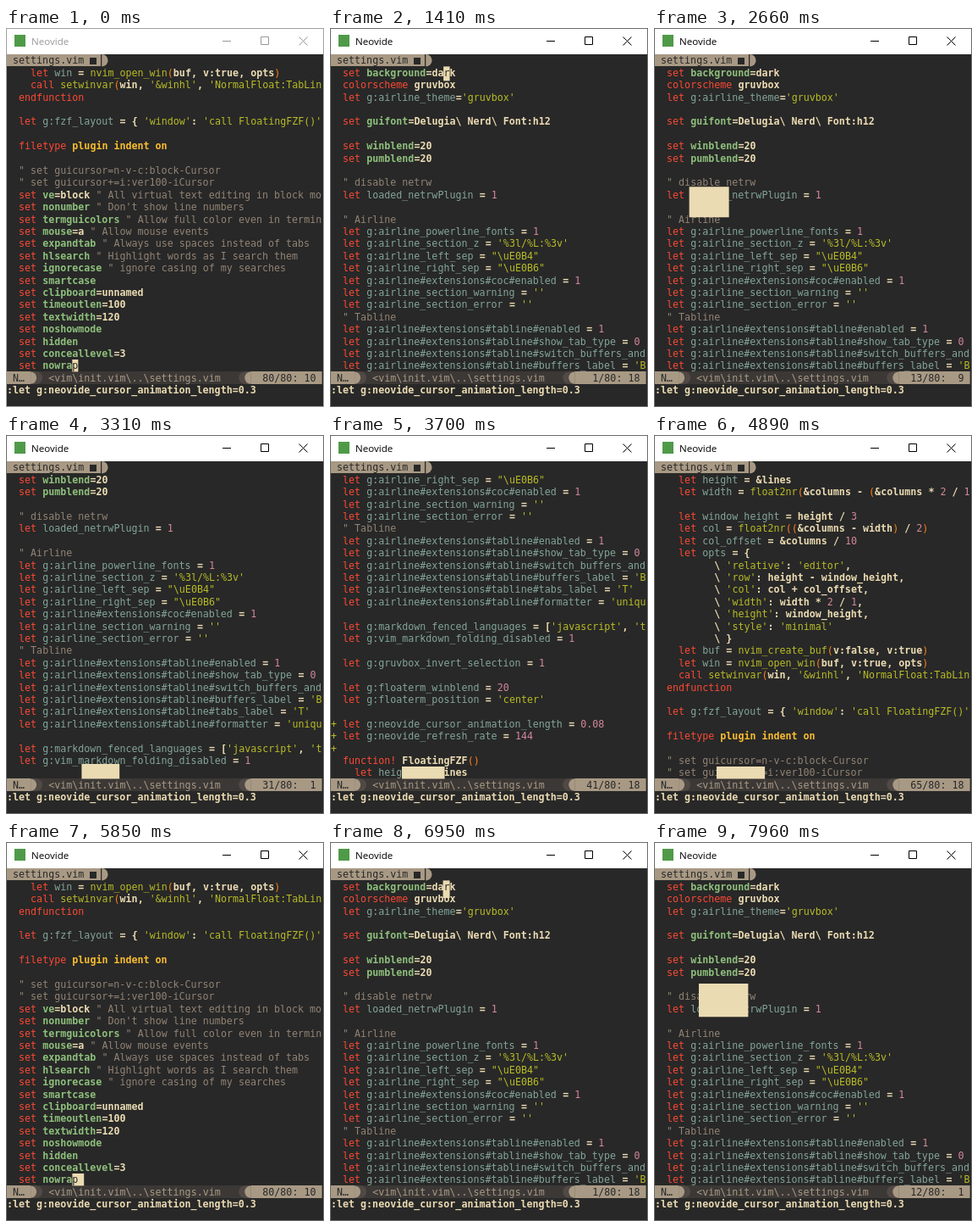
Write an HTML page with a canvas that moves like this. It is 376x447 px and loops after 7.99 s.

```html
<!DOCTYPE html>
<html lang="en">
<head>
<meta charset="utf-8">
<title>Neovide</title>
<style>
  html, body { margin: 0; width: 100%; height: 100%; overflow: hidden; background: #282828; }
  canvas { display: block; width: 376px; height: 447px; }
</style>
</head>
<body>
<canvas id="stage" width="376" height="447"></canvas>
<script>
const ctx = document.getElementById('stage').getContext('2d');
const LOOP = 7990, ROWS = 25, WANTED_COLUMN = 18;
const CELL_W = 7.03, CELL_H = 14.4, LEFT = 1, TOP = 31;
const MONO = '11.677px "DejaVu Sans Mono", monospace';
const C = {
  bg: '#282828', fg: '#ebdbb2', red: '#fb4934', green: '#b8bb26', yellow: '#fabd2f',
  blue: '#83a598', purple: '#d3869b', aqua: '#8ec07c', orange: '#fe8019',
  gray: '#928374', bar: '#3c3836', barMid: '#504945', barLight: '#a89984'
};
const BOLD = [C.fg, C.aqua, C.yellow];

const lines = String.raw`set background=dark
colorscheme gruvbox
let g:airline_theme='gruvbox'

set guifont=Delugia\ Nerd\ Font:h12

set winblend=20
set pumblend=20

" disable netrw
let loaded_netrwPlugin = 1

" Airline
let g:airline_powerline_fonts = 1
let g:airline_section_z = '%3l/%L:%3v'
let g:airline_left_sep = "\uE0B4"
let g:airline_right_sep = "\uE0B6"
let g:airline#extensions#coc#enabled = 1
let g:airline_section_warning = ''
let g:airline_section_error = ''
" Tabline
let g:airline#extensions#tabline#enabled = 1
let g:airline#extensions#tabline#show_tab_type = 0
let g:airline#extensions#tabline#switch_buffers_and
let g:airline#extensions#tabline#buffers_label = 'B
let g:airline#extensions#tabline#tabs_label = 'T'
let g:airline#extensions#tabline#formatter = 'uniqu

let g:markdown_fenced_languages = ['javascript', 't
let g:vim_markdown_folding_disabled = 1

let g:gruvbox_invert_selection = 1

let g:floaterm_winblend = 20
let g:floaterm_position = 'center'

let g:neovide_cursor_animation_length = 0.08
let g:neovide_refresh_rate = 144

function! FloatingFZF()
  let height = &lines
  let width = float2nr(&columns - (&columns * 2 / 1

  let window_height = height / 3
  let col = float2nr((&columns - width) / 2)
  let col_offset = &columns / 10
  let opts = {
        \ 'relative': 'editor',
        \ 'row': height - window_height,
        \ 'col': col + col_offset,
        \ 'width': width * 2 / 1,
        \ 'height': window_height,
        \ 'style': 'minimal'
        \ }
  let buf = nvim_create_buf(v:false, v:true)
  let win = nvim_open_win(buf, v:true, opts)
  call setwinvar(win, '&winhl', 'NormalFloat:TabLin
endfunction

let g:fzf_layout = { 'window': 'call FloatingFZF()'

filetype plugin indent on

" set guicursor=n-v-c:block-Cursor
" set guicursor+=i:ver100-iCursor
set ve=block " All virtual text editing in block mo
set nonumber " Don't show line numbers
set termguicolors " Allow full color even in termin
set mouse=a " Allow mouse events
set expandtab " Always use spaces instead of tabs
set hlsearch " Highlight words as I search them
set ignorecase " ignore casing of my searches
set smartcase
set clipboard=unnamed
set timeoutlen=100
set textwidth=120
set noshowmode
set hidden
set conceallevel=3
set nowrap`.split('\n');

// Syntax highlighting: each line becomes a list of [text, colour].
const syntax = /(^\s*(?:let|call|colorscheme|filetype|function!|endfunction))|((?<=let )[\w:#]+)|('[^']*'?|"[^"]*"?)|(\d[\d.]*)|([()])|([a-z]\w*(?=\())|(plugin indent on)|(\w+|\s+|.)/g;
const syntaxColors = [C.red, C.blue, C.green, C.purple, C.orange, C.green, C.yellow, C.fg];

function highlight(line) {
  if (line.startsWith('"')) return [[line, C.gray]];
  const option = line.match(/^(set )(\w+)([^"]*)(.*)$/);
  if (option) return [C.red, C.aqua, C.fg, C.gray].map((color, i) => [option[i + 1], color]);
  return [...line.matchAll(syntax)].map(m =>
    [m[0], syntaxColors[m.slice(1).findIndex(group => group !== undefined)]]);
}
const highlighted = lines.map(highlight);

// [time, line]: two trips to the top with "gg", each followed by holding "j".
const moves = [
  [0, 80], [990, 1], [1725, 2], [2258, 3], [2638, 13], [3643, 40], [4100, 48], [4236, 52],
  [4887, 65], [5680, 80], [6605, 1], [7230, 2], [7653, 3], [7941, 12]
];
const pendingKey = [[820, 990], [6555, 6605]];

function lineAt(t) {
  let i = moves.length - 1;
  while (moves[i][0] > t) i--;
  const [start, line] = moves[i];
  const next = moves[i + 1];
  if (!next || next[1] < line) return line;
  return Math.floor(line + (next[1] - line) * (t - start) / (next[0] - start) + 1e-6);
}

// The view scrolls only as far as needed to keep the line visible.
const topLine = line => Math.max(1, line - ROWS + 1);
const columnAt = line => Math.max(1, Math.min(WANTED_COLUMN, lines[line - 1].length));
const cellX = col => LEFT + col * CELL_W;
const cellY = row => TOP + row * CELL_H;

function targetEdges(line) {
  const x = cellX(columnAt(line) + 1), y = cellY(line - topLine(line) + 1);
  return [x, y, x + CELL_W, y + CELL_H];
}

// Each edge chases its cell exponentially; the leading edge is quicker than the trailing one.
function cursorAt(t) {
  const step = 4, leading = 0.0345, trailing = 0.0117;
  const edges = targetEdges(80);
  for (let now = 0; now < t; now += step) {
    const dt = Math.min(step, t - now);
    targetEdges(lineAt(now)).forEach((goal, i) => {
      const distance = goal - edges[i];
      const leads = i < 2 ? distance < 0 : distance > 0;
      edges[i] += distance * (1 - Math.exp(-(leads ? leading : trailing) * dt));
    });
  }
  return edges;
}

function rect(color, x, y, w, h) {
  ctx.fillStyle = color;
  ctx.fillRect(x, y, w, h);
}

function text(string, col, row, color) {
  ctx.font = (BOLD.includes(color) ? 'bold ' : '') + MONO;
  ctx.fillStyle = color;
  ctx.fillText(string, cellX(col), cellY(row) + 11.3);
}

function cells(color, from, to, row) {
  const y = Math.round(cellY(row));
  rect(color, cellX(from), y, (to - from) * CELL_W, Math.round(cellY(row + 1)) - y);
}

// Rounded separator, one cell wide; direction 1 bulges right, -1 left.
function cap(color, col, row, direction) {
  ctx.fillStyle = color;
  ctx.beginPath();
  ctx.ellipse(cellX(col + (direction < 0 ? 1 : 0)), cellY(row) + CELL_H / 2, CELL_W, CELL_H / 2,
    0, -Math.PI / 2, Math.PI / 2, direction < 0);
  ctx.fill();
}

function drawTitleBar(focused) {
  const ink = focused ? '#000' : '#999';
  rect('#fff', 0, 0, 376, 31);
  rect('#4f9a48', 10, 8, 13, 14);
  ctx.font = '11.6px "Open Sans", "Noto Sans", sans-serif';
  ctx.fillStyle = ink;
  ctx.fillText('Neovide', 30, 20);
  ctx.strokeStyle = ink;
  ctx.lineWidth = 1;
  ctx.beginPath();
  ctx.moveTo(256, 15.5); ctx.lineTo(266, 15.5);
  ctx.rect(301.5, 10.5, 9, 9);
  ctx.moveTo(346.5, 10.5); ctx.lineTo(356.5, 20.5);
  ctx.moveTo(356.5, 10.5); ctx.lineTo(346.5, 20.5);
  ctx.stroke();
}

function drawTabLine() {
  cells(C.barLight, 0, 16, 0);
  cap(C.barLight, 16, 0, 1);
  text('settings.vim', 1, 0, C.bg);
  rect(C.bg, 99, 35, 8, 8);
  rect(C.bg, 112, TOP, 1, 14);
}

function drawStatus(line) {
  const row = ROWS + 1;
  cells(C.bar, 0, 53, row);
  cells(C.barMid, 4, 5, row);
  cap(C.barMid, 5, row, 1);
  cells(C.barLight, 0, 4, row);
  cap(C.barLight, 4, row, 1);
  text('N…', 1, row, C.bg);
  text('<vim\\init.vim\\..\\settings.vim', 7, row, C.barLight);
  cap(C.barMid, 39, row, -1);
  cells(C.barMid, 40, 41, row);
  cap(C.barLight, 40, row, -1);
  cells(C.barLight, 41, 53, row);
  text(String(line).padStart(2) + '/80:', 43, row, C.bg);
  text(String(columnAt(line)).padStart(3), 49, row, C.bg);
}

function drawBuffer(first) {
  for (let row = 1; row <= ROWS; row++) {
    const number = first + row - 1;
    if (number >= 37 && number <= 39) text('+', 0, row, C.green);
    let col = 2;
    for (const [part, color] of highlighted[number - 1]) {
      if (part.trim()) text(part, col, row, color);
      col += part.length;
    }
  }
}

function drawCursor(t, line) {
  const [left, top, right, bottom] = cursorAt(t);
  ctx.save();
  ctx.beginPath();
  ctx.rect(left, top, right - left, bottom - top);
  ctx.fillStyle = C.fg;
  ctx.fill();
  ctx.clip();
  const col = columnAt(line);
  text(lines[line - 1][col - 1] || ' ', col + 1, line - topLine(line) + 1, C.bg);
  ctx.restore();
}

function draw(t) {
  const line = lineAt(t), focused = t >= 500;
  rect(C.bg, 0, 0, 376, 447);
  drawTitleBar(focused);
  drawTabLine();
  drawBuffer(topLine(line));
  drawStatus(line);
  text(':let g:neovide_cursor_animation_length=0.3', 0, ROWS + 2, C.fg);
  if (pendingKey.some(([from, to]) => t >= from && t < to)) text('g', 42, ROWS + 2, C.fg);
  drawCursor(t, line);
  ctx.strokeStyle = focused ? '#6b6b6b' : '#a0a0a0';
  ctx.lineWidth = 1;
  ctx.strokeRect(0.5, 0.5, 375, 446);
}

const begin = performance.now();
function frame() {
  draw((performance.now() - begin) % LOOP);
  requestAnimationFrame(frame);
}
frame();
</script>
</body>
</html>
```
